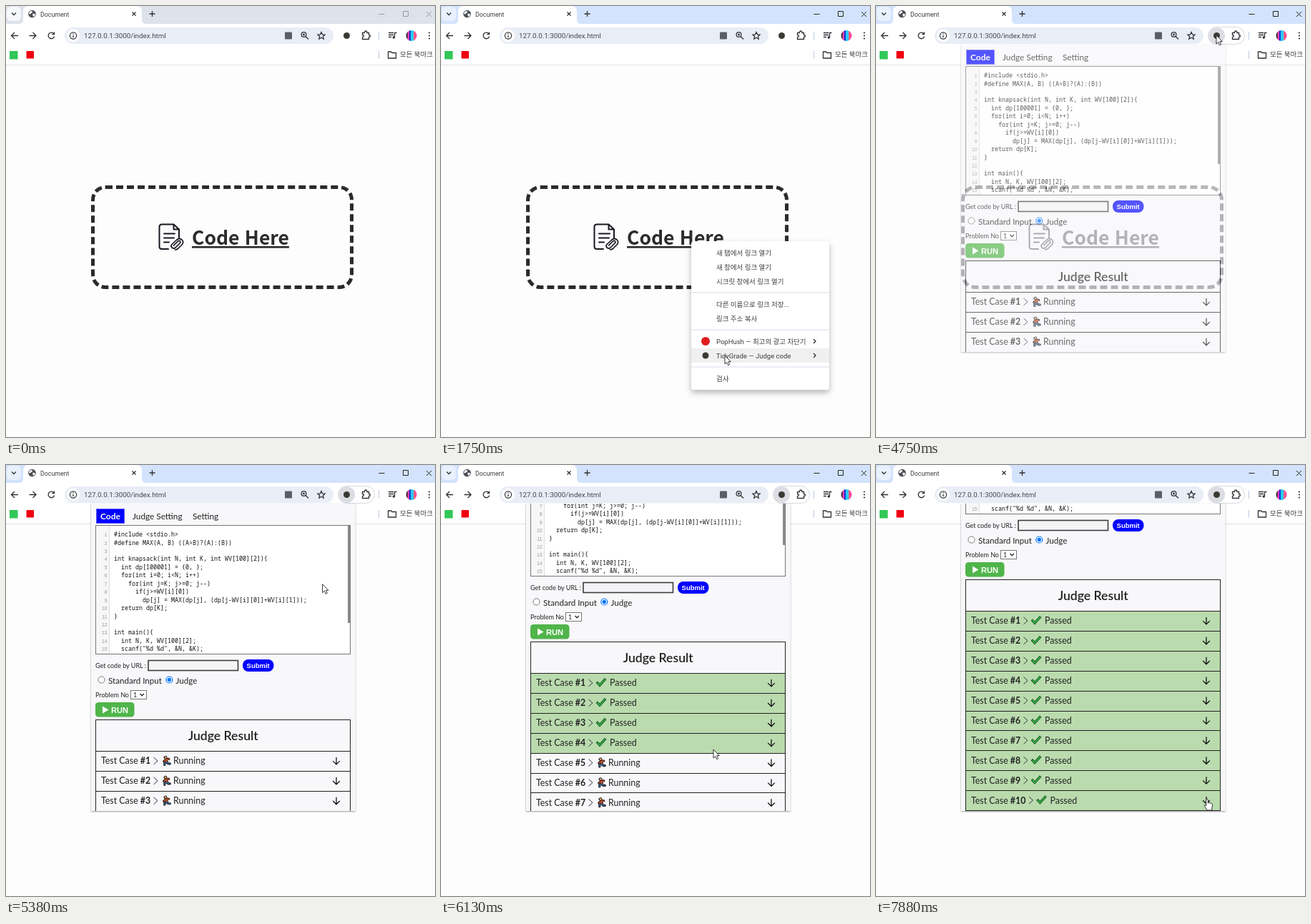
An HTML page for the animation above (8 s loop, 600 by 603 pixels).

```html
<!DOCTYPE html>
<html lang="ko">
<head>
<meta charset="utf-8">
<title>Document</title>
<style>
  html, body { margin: 0; width: 100%; height: 100%; overflow: hidden; background: #fefdfe; }
  svg { display: block; width: 100vw; height: 100vh; }
  text { white-space: pre; }
  .ui { font-family: Roboto, 'Noto Sans CJK KR', 'Noto Sans CJK', sans-serif; font-size: 9.5px; fill: #3c3e42; }
  .app { font-family: Lato, 'Noto Sans', sans-serif; font-size: 12.4px; fill: #222; }
  .small { font-size: 9px; }
  .mid { font-size: 11.6px; }
  .bold { font-family: 'Liberation Sans', Arial, sans-serif; font-weight: 700; fill: #fff; }
  .code { font-family: 'Noto Sans Mono', 'DejaVu Sans Mono', monospace; font-size: 8.33px; fill: #111; }
  .num { font-family: 'Liberation Sans', Arial, sans-serif; font-size: 6.8px; fill: #999; text-anchor: end; }
  .line { fill: none; stroke: #303236; stroke-width: 1.3; }
  .crisp { shape-rendering: crispEdges; }
  .drop { box-sizing: border-box; width: 367px; height: 145px; border: 5px dashed #2d2a2e; border-radius: 20px; }
</style>
</head>
<body>
<svg id="stage" viewBox="0 0 600 603" preserveAspectRatio="none"></svg>
<script>
const LOOP = 8000, TICK = 125;
const ROW = 27.9, TABLE_TOP = 356, HEAD = 44;

const esc = s => s.replace(/&/g, '&amp;').replace(/</g, '&lt;');
const text = (x, y, s, cls, extra = '') => `<text x="${x}" y="${y}" class="${cls}" ${extra}>${esc(s)}</text>`;
const rect = (x, y, w, h, fill, extra = '') => `<rect x="${x}" y="${y}" width="${w}" height="${h}" fill="${fill}" ${extra}/>`;
const disc = (x, y, r, fill, extra = '') => `<circle cx="${x}" cy="${y}" r="${r}" fill="${fill}" ${extra}/>`;
const line = (d, extra = '') => `<path d="${d}" class="line" ${extra}/>`;

function browser() {
  const stripes = ['#111', '#ff3fb4', '#1c2fd0', '#25c8f2', '#25c8f2', '#ff4f6a', '#ff2f9a'];
  return `
    <rect id="strip" width="600" height="25"/>
    <rect id="search" x="1" y="1" width="20" height="20" rx="6"/>
    ${line('M8 9.5 l3 3 l3 -3')}
    <path d="M18 25 q6 0 6 -6 V8 q0 -8 8 -8 H182 q8 0 8 8 V19 q0 6 6 6 Z" fill="#fff"/>
    ${disc(36.5, 11, 5.3, '#4c5056')}
    <path d="M33 8 q3 -2 4 0 q0 2 -2 2 q0 2 -3 1 Z M37 11 q3 -1 4 1 q-1 3 -3 3 Z" fill="#fff"/>
    ${text(48, 14.5, 'Document', 'ui', 'style="font-size:8.8px"')}
    ${line('M176.5 8.5 l5 5 m0 -5 l-5 5')}
    ${line('M204.5 7 v8 m-4 -4 h8')}
    <g id="controls" fill="none" stroke-width="1"><path d="M521.5 11.5 h8 M555.5 7.5 h7 v7 h-7 Z M588 8 l7 7 m0 -7 l-7 7"/></g>
    ${rect(0, 25, 600, 57, '#fff')}
    ${rect(0, 82, 600, 1, '#dde2ea')}
    ${line('M17 41.5 H7.5 m4.5 -4.5 l-4.5 4.5 l4.5 4.5')}
    ${line('M32.5 41.5 H42 m-4.5 -4.5 l4.5 4.5 l-4.5 4.5')}
    ${line('M67 39 a4.3 4.3 0 1 0 0.6 3.5 M67.5 36.5 v3.2 h-3.2')}
    ${rect(82, 30, 376, 23, '#e9edf6', 'rx="11.5"')}
    ${disc(94, 41.5, 9, '#fff')}
    ${disc(94, 41.5, 4.6, 'none', 'stroke="#303236" stroke-width="1.2"')}
    ${line('M94 41 v3 M94 38.6 v1.2')}
    ${text(109, 45, '127.0.0.1:3000/index.html', 'ui', 'style="font-size:9.8px;fill:#44474c"')}
    ${rect(390, 36.5, 10, 10, '#5a5e65', 'rx="1"')}
    ${disc(416.5, 40, 3.4, 'none', 'class="line"')}
    ${line('M419 42.5 l4 4 M415 40 h3 m-1.5 -1.5 v3')}
    ${line('M441 36.5 l1.5 3.3 l3.6 .4 l-2.7 2.4 l.8 3.6 l-3.2 -1.9 l-3.2 1.9 l.8 -3.6 l-2.7 -2.4 l3.6 -.4 Z', 'stroke-width="1.1"')}
    <g id="pill" display="none">
      ${rect(464.5, 29.5, 51, 24, '#fff', 'rx="12" stroke="#d6dae2"')}
    </g>
    <g id="hover" display="none">${disc(476.5, 41.5, 11.5, '#dcdde3')}</g>
    ${disc(476.5, 41.5, 4.5, '#3a3a34')}
    ${line('M498.5 37.5 h3 q0 -2.5 1.7 -2.5 q1.7 0 1.7 2.5 h2.6 v3 q2 0 2 1.5 q0 1.5 -2 1.5 v3 h-9 v-3 q2 0 2 -1.5 q0 -1.5 -2 -1.5 Z')}
    ${rect(521, 36, 1, 11, '#bccbe6')}
    ${line('M535 37.5 h7 m-7 3 h7 m-7 3 h4 M543.5 44 V37.5 h3')}
    ${disc(542.3, 44, 1.7, '#303236')}
    <clipPath id="face"><circle cx="567" cy="41.5" r="7.5"/></clipPath>
    <g clip-path="url(#face)">${stripes.map((c, i) => rect(559.5 + i * 2.15, 34, 2.3, 15, c)).join('')}</g>
    ${[37.5, 41.5, 45.5].map(y => disc(592, y, 1.1, '#303236')).join('')}
    ${rect(5, 63, 11.5, 11.5, '#32c758')}
    ${rect(28.5, 63, 10.5, 10.5, '#f00010', 'rx="1"')}
    ${rect(521, 63, 1, 11, '#bccbe6')}
    ${line('M534.5 64 h4 l1.5 1.5 h5.5 v7.5 h-11 Z', 'stroke-width="1.2"')}
    ${text(551, 71, '모든 북마크', 'ui')}`;
}

function page() {
  return `
    <foreignObject x="119" y="250.5" width="367" height="145"><div class="drop"></div></foreignObject>
    <g fill="none" stroke="#17171f" stroke-width="2" stroke-linecap="round" stroke-linejoin="round">
      <path d="M227 340 h-9 q-3.5 0 -3.5 -3.5 V309 q0 -3.5 3.5 -3.5 h16.5 l7.5 7 V324 M234.5 305.5 v7 h7"/>
      <path d="M221 318.5 h15 M221 324.5 h14 M221 330.5 h7"/>
      <path d="M234.5 335 l6 -6 q2 -1.5 3 0 q1 1.5 -.5 3 l-6.5 6.5 q-2 1.5 -4.5 -.5 q-2 -2.5 0 -4.5 l7 -6.5 q3.5 -3 7 0 q3 3 .5 6.5 l-6 6 q-2 1.5 -4 1.5" stroke-width="1.7"/>
    </g>
    <text x="260" y="334" font-size="26.5" font-weight="700" fill="#2d2a2e" text-decoration="underline"
      font-family="'Noto Sans CJK KR', 'Noto Sans CJK', 'Noto Sans', sans-serif">Code Here</text>`;
}

const MENU = [
  [345, '새 탭에서 링크 열기'], [365, '새 창에서 링크 열기'], [385, '시크릿 창에서 링크 열기'],
  [417, '다른 이름으로 링크 저장...'], [437, '링크 주소 복사'],
  [469, 'PopHush — 최고의 광고 차단기', '#e01b1b', 6], [489, 'TidyGrade — Judge code', '#3a3a34', 4.5],
  [521, '검사']
];

function menu() {
  const items = MENU.map(([y, label, color, r]) => text(385, y + 3.5, label, 'ui') +
    (color ? disc(370, y, r, color) + line(`M521 ${y - 3} l3 3 l-3 3`, 'stroke-width="1.1"') : ''));
  return `<g id="menu" filter="url(#shadow)">
    ${rect(350, 329, 193, 208, '#fff', 'rx="4"')}
    <rect id="menuHover" x="350" width="193" height="20" fill="#f0f0f1"/>
    ${[401, 453, 505].map(y => rect(350, y - 0.5, 193, 1, '#d3ddec')).join('')}
    ${items.join('')}
  </g>
  <g id="submenu" filter="url(#shadow)">
    ${rect(541, 476, 90, 36, '#fff', 'rx="4"')}
    <rect id="subHover" x="541" y="484" width="90" height="20" fill="#f0f0f1"/>
  </g>`;
}

const CODE = `#include <stdio.h>
#define MAX(A, B) ((A>B)?(A):(B))

int knapsack(int N, int K, int WV[100][2]){
  int dp[100001] = {0, };
  for(int i=0; i<N; i++)
    for(int j=K; j>=0; j--)
      if(j>=WV[i][0])
        dp[j] = MAX(dp[j], (dp[j-WV[i][0]]+WV[i][1]));
  return dp[K];
}

int main(){
  int N, K, WV[100][2];
  scanf("%d %d", &N, &K);`.split('\n');

function editor() {
  const lines = CODE.map((s, i) => {
    const y = 100.2 + i * 11.43;
    return text(141.5, y, String(i + 1), 'num') + text(151, y, s, 'code');
  });
  return `<clipPath id="editor"><rect x="125" y="84" width="357" height="180.5"/></clipPath>
    <g clip-path="url(#editor)">
      ${rect(125, 84, 357, 181, '#fff')}${rect(125, 84, 19, 181, '#f7f7f7')}${rect(144, 84, 1, 181, '#ddd')}
      ${lines.join('')}
      ${rect(478, 84, 4, 137, '#8b8b8b')}
    </g>
    ${rect(125.5, 84.5, 356, 180, 'none', 'stroke="#777" class="crisp"')}`;
}

const RUNNER = `<g id="runner"><g transform="translate(12.3 0) scale(-1 1)" fill="none" stroke-linecap="round" stroke-linejoin="round">
  <path d="M2 3.5 l4 0 l-1.5 4 l3.5 1.5 v2.5 M4.5 7.5 l-1.5 2.5 h-2.5 M6 4 l3 2.5" stroke="#1c1c1c" stroke-width="3.2"/>
  <path d="M4.5 7.5 l3.5 1.5 v2.5 M4.5 7.5 l-1.5 2.5 h-2" stroke="#3a6ea8" stroke-width="1.3"/>
  <path d="M2 4 l4 -.3 l-1 3.5 M6 4 l2.5 2.5" stroke="#d8502c" stroke-width="1.5"/>
  <circle cx="6.8" cy="1.2" r="2" fill="#e8a060" stroke="#1c1c1c"/></g></g>`;
const CHECK = `<g id="check" fill="none" stroke-linecap="square">
  <path d="M1.5 6 l3 3.2 l7 -7.7" stroke="#14501c" stroke-width="3.4"/>
  <path d="M1.5 6 l3 3.2 l7 -7.7" stroke="#35b44a" stroke-width="1.7"/></g>`;

function caseRow(i) {
  const y = TABLE_TOP + HEAD + i * ROW, mid = y + ROW / 2, dx = i === 9 ? 7.5 : 0;
  const state = (icon, label, x) =>
    `<use href="#${icon}" x="${217.5 + dx}" y="${mid - 6}"/>` + text(x + dx, mid + 4.5, label, 'app');
  return `<rect class="cell crisp" x="125.5" y="${y + 0.5}" width="356" height="${ROW}" stroke="#222"/>
    <text x="133" y="${mid + 4.5}" class="app">Test Case <tspan font-weight="700">#${i + 1}</tspan></text>
    ${line(`M${206.5 + dx} ${mid - 5} l5.5 5 l-5.5 5`, 'style="stroke-width:1"')}
    <g class="running">${state('runner', 'Running', 234)}</g>
    <g class="passed">${state('check', 'Passed', 236)}</g>
    ${line(`M462 ${mid - 5} v10 m-4.8 -4.8 l4.8 4.8 l4.8 -4.8`, 'style="stroke:#111"')}`;
}

function popup() {
  return `<g id="popup">
    ${rect(119, 54, 369.5, 430, '#f8f7fa', 'filter="url(#edge)"')}
    <clipPath id="view"><rect x="119" y="54" width="370" height="430"/></clipPath>
    <g clip-path="url(#view)"><g id="content">
      ${rect(126, 61, 40, 21, '#0000ff')}
      ${rect(126.5, 61.5, 39, 20, 'none', 'stroke="#b8b8f4" stroke-dasharray="1 1"')}
      ${text(146, 75.5, 'Code', 'app', 'text-anchor="middle" font-weight="700" style="fill:#fff;font-size:12px"')}
      ${text(177, 75.5, 'Judge Setting', 'app', 'style="font-size:11.8px"')}
      ${text(261, 75.5, 'Setting', 'app', 'style="font-size:11.8px"')}
      ${editor()}
      ${text(125, 284, 'Get code by URL :', 'app small')}
      ${rect(199, 273.5, 125.5, 14, '#f4f4f6', 'stroke="#3c3c3c" stroke-width="1.6"')}
      ${rect(331, 272, 43.5, 17, '#0000ff', 'rx="8"')}
      ${text(352.7, 284, 'Submit', 'bold', 'text-anchor="middle" font-size="9.5"')}
      ${disc(133.5, 300.5, 4.6, '#fff', 'stroke="#767676"')}
      ${text(143, 305.7, 'Standard Input', 'app mid')}
      ${disc(228.3, 300.5, 4.5, '#fff', 'stroke="#0075ff" stroke-width="1.2"')}${disc(228.3, 300.5, 2.7, '#0075ff')}
      ${text(237.5, 305.7, 'Judge', 'app mid')}
      ${text(125, 325, 'Problem No', 'app small')}
      ${rect(174.5, 315.5, 22, 12, '#fff', 'stroke="#767676"')}
      ${text(178, 325, '1', 'app small')}
      ${line('M187.5 320 l2.7 2.7 l2.7 -2.7', 'style="stroke-width:1.5"')}
      ${rect(125, 332, 54.5, 20.5, '#4fb54a', 'rx="4.5"')}
      <path d="M135 337.5 l8.5 5 l-8.5 5 Z" fill="#fff"/>
      ${text(147, 346.5, 'RUN', 'bold', 'font-size="11.1"')}
      ${rect(125.5, TABLE_TOP + 0.5, 356, HEAD, '#f8f7fa', 'stroke="#222" class="crisp"')}
      ${text(303.7, 384.5, 'Judge Result', 'app', 'text-anchor="middle" font-weight="600" style="font-size:17.6px"')}
      ${Array.from({ length: 10 }, (_, i) => `<g class="case">${caseRow(i)}</g>`).join('')}
    </g></g>
  </g>`;
}

const cursor = `<g id="cursor" stroke="#222" stroke-width=".9" fill="#fff" stroke-linejoin="round">
  <path id="arrow" d="M0 0 V12 l2.7 -2.5 l2 4.2 l2 -1 l-2 -4 h3.6 Z"/>
  <path id="hand" d="M-1.3 1 q1.3 -2 2.6 0 V6 l1 -.8 l1.6 .8 l1.6 0 l1.5 1 q.8 .5 .6 2 l-.9 5 v2 h-6.5 l-3.5 -5.5 q-1 -2 .5 -2 l1.5 1.5 Z"/>
</g>`;

document.getElementById('stage').innerHTML = `
  <defs>
    <filter id="shadow" x="-20%" y="-20%" width="140%" height="140%"><feDropShadow dx="0" dy="4" stdDeviation="4" flood-opacity=".28"/></filter>
    <filter id="edge"><feDropShadow dx="0" dy="1" stdDeviation="1" flood-opacity=".4"/></filter>
    ${RUNNER}${CHECK}
  </defs>
  ${rect(0, 0, 600, 603, '#fefdfe')}
  ${browser()}${page()}${menu()}${popup()}${cursor}`;

const el = Object.fromEntries([...document.querySelectorAll('svg [id]')].map(n => [n.id, n]));
const cases = [...document.querySelectorAll('.case')].map(g => ({
  cell: g.querySelector('.cell'), running: g.querySelector('.running'), passed: g.querySelector('.passed')
}));
const show = (node, on) => node.setAttribute('display', on ? 'inline' : 'none');
const clamp = v => Math.max(0, Math.min(1, v));
const ramp = (t, a, b) => clamp((t - a) / (b - a));
const ease = u => u * u * (3 - 2 * u);

// time, x, y of the pointer tip
const TRACK = [
  [250, 600, 190], [1000, 350, 329], [1125, 350, 329], [1750, 397, 489], [2125, 397, 489],
  [2625, 563, 492], [3125, 563, 492], [3875, 476, 41], [5125, 476, 41], [5750, 381, 398],
  [6750, 381, 398], [7625, 462, 457], [7875, 463, 467]
];
const PASS_AT = [6000, 5500, 5625, 5750, 6250, 6375, 6875, 7000, 7250, 7375];

function pointer(t) {
  const k = TRACK.findIndex(p => p[0] > t);
  if (k < 0) return TRACK[TRACK.length - 1].slice(1);
  if (k === 0) return TRACK[0].slice(1);
  const [a, b] = [TRACK[k - 1], TRACK[k]], u = ease(ramp(t, a[0], b[0]));
  return [a[1] + (b[1] - a[1]) * u, a[2] + (b[2] - a[2]) * u];
}

function scrollAt(t) {
  return Math.round(22 * ramp(t, 5750, 5875) + 174 * ease(ramp(t, 5875, 6375)));
}

function render(now) {
  const t = Math.floor((now % LOOP + 5) / TICK) * TICK;
  const [x, y] = pointer(t);
  const active = t >= 1000 && t < LOOP;

  el.strip.setAttribute('fill', active ? '#d3e3fd' : '#dee2eb');
  el.search.setAttribute('fill', active ? '#e9f1fe' : '#f7f8fb');
  el.controls.setAttribute('stroke', active ? '#222' : '#969aa2');

  const menuOpen = t >= 1125 && t < 3125;
  show(el.menu, menuOpen);
  show(el.submenu, menuOpen && t >= 2125);
  show(el.subHover, x > 541);
  const hot = t >= 2125 ? 489 : (MENU.find(m => Math.abs(m[0] - y) <= 10) || [0])[0];
  show(el.menuHover, hot > 0);
  el.menuHover.setAttribute('y', hot - 10);

  show(el.hover, t >= 3875);
  show(el.pill, t >= 4000);
  show(el.popup, t > 4500);
  el.popup.setAttribute('opacity', ramp(t, 4500, 4875));
  el.content.setAttribute('transform', `translate(0 ${-scrollAt(t)})`);
  cases.forEach((c, i) => {
    const done = t >= PASS_AT[i];
    c.cell.setAttribute('fill', done ? '#badbae' : '#f8f7fa');
    show(c.running, !done);
    show(c.passed, done);
  });

  const onLink = t < 1125 && x > 210 && x < 397 && y > 304 && y < 346;
  const hand = onLink || t >= 7500;
  show(el.cursor, t > 250);
  show(el.arrow, !hand);
  show(el.hand, hand);
  el.cursor.setAttribute('transform', `translate(${x} ${y})`);
}

const start = performance.now();
function frame(now) {
  render(Math.max(0, now - start));
  requestAnimationFrame(frame);
}
render(0);
requestAnimationFrame(frame);
</script>
</body>
</html>
```
